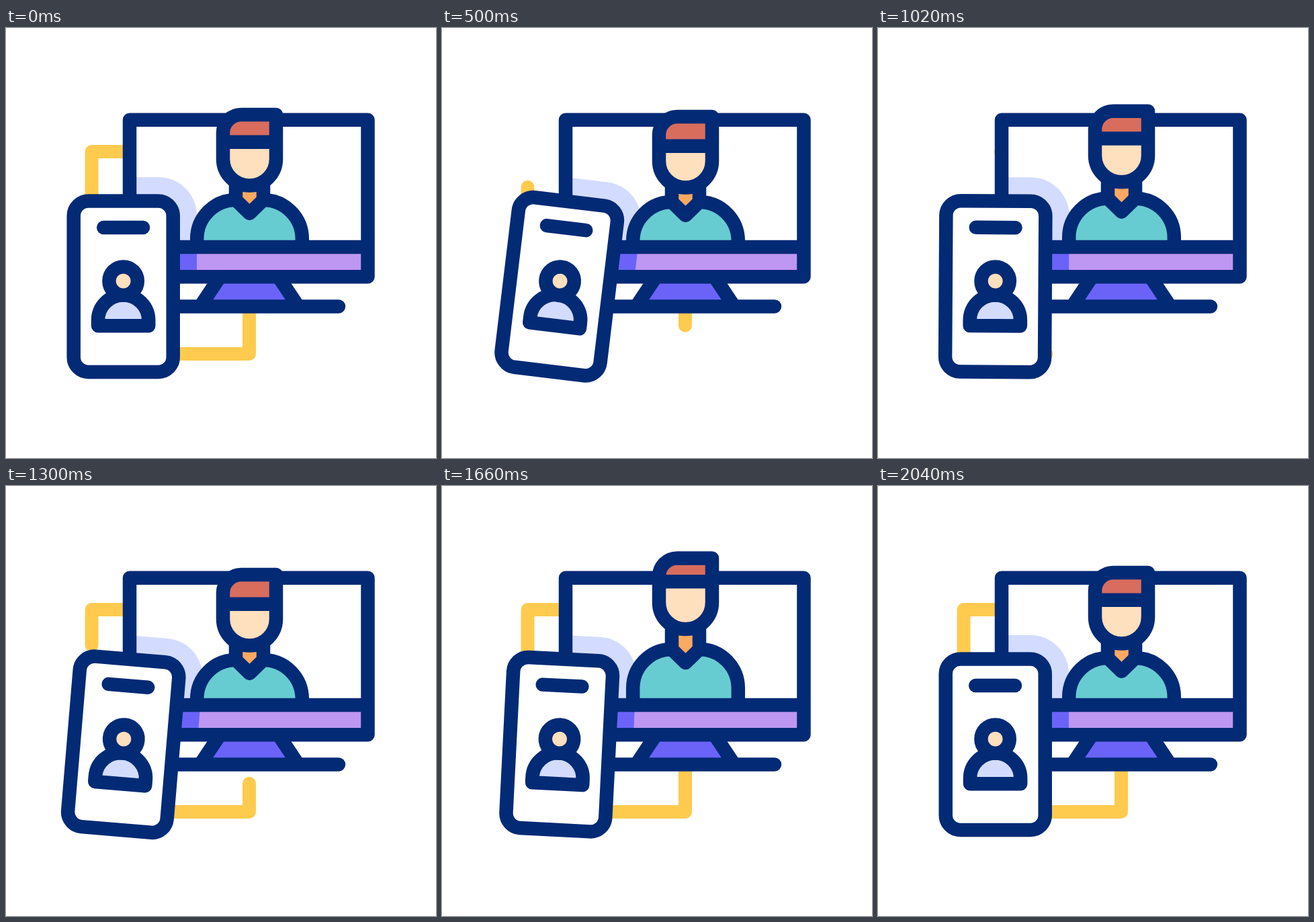
Animation of 640 by 640 pixels, one loop 2420 ms. Source, as an HTML page:

```html
<!DOCTYPE html>
<html lang="en">
<head>
<meta charset="utf-8">
<title>Video call</title>
<style>
  html, body { margin: 0; width: 100%; height: 100%; overflow: hidden; background: #fff; }
  svg { display: block; width: 100vw; height: 100vh; }
  .line { fill: none; stroke: #032a75; stroke-width: 20.5; stroke-linejoin: round; }
  .round { stroke-linecap: round; }
  .link { fill: none; stroke: #fecb4f; stroke-width: 20; stroke-linejoin: round; stroke-linecap: round; }
</style>
</head>
<body>
<svg viewBox="0 0 640 640">
  <defs>
    <clipPath id="screen"><rect x="184" y="137" width="354" height="189"/></clipPath>
    <clipPath id="bar"><rect x="184" y="326" width="354" height="44"/></clipPath>
    <rect id="halo" x="65" y="222" width="219" height="326" rx="57"/>
  </defs>

  <path class="link" pathLength="1" d="M184 184H127.5V257"/>
  <path class="link" pathLength="1" d="M249 485H362V414"/>

  <!-- monitor -->
  <path d="M318.7 370L289.3 414H434.7L405.3 370Z" fill="#6b63f8"/>
  <path class="line" d="M318.7 370L289.3 414M405.3 370L434.7 414"/>
  <path class="line round" d="M200 414.5H495"/>
  <rect x="184" y="136.7" width="354.5" height="189" fill="#fff"/>
  <rect x="184" y="326" width="354.5" height="44" fill="#bd97f1"/>
  <g clip-path="url(#screen)"><use class="tilt" href="#halo" fill="#d3dcfe"/></g>
  <g clip-path="url(#bar)"><use class="tilt" href="#halo" fill="#6b63f8"/></g>
  <rect class="line" x="184" y="136.7" width="354.5" height="233.6"/>

  <!-- person -->
  <path id="neck" fill="#fda961"/>
  <path id="neckSides" class="line"/>
  <path id="body" class="line" style="fill:#67ccd1"/>
  <path class="line" d="M184 326H538"/>
  <path id="face" fill="#fedfbe"/>
  <path id="hair" fill="#d86d5e"/>
  <path id="band" class="line"/>
  <path id="head" class="line"/>

  <!-- phone -->
  <g class="tilt">
    <rect class="line" x="100.7" y="257.5" width="148" height="254.4" rx="22" style="fill:#fff"/>
    <path class="line round" d="M145.2 297H204"/>
    <path class="line" d="M137 443.3V435A37.6 37.6 0 0 1 212.2 435V443.3Z" style="fill:#d3dcfe"/>
    <circle class="line" cx="174.6" cy="376.6" r="21.2" style="fill:#fedfbe"/>
  </g>
</svg>
<script>
const LOOP = 2420, TICK = 20;
const $ = id => document.getElementById(id);
const tilted = document.querySelectorAll('.tilt');
const links = document.querySelectorAll('.link');

// Keys are [tick, value] pairs, eased in and out between neighbours.
const tilt = [[0, 0], [20, 10], [40, -10], [60, 8], [74, -3], [86, 4], [102, 0]];
const bounce = (low, high) => [[0, 0], [20, low], [40, high], [60, low], [80, high], [102, 0]];
const bodyMove = bounce(6, -13.6);
const headMove = bounce(7.8, -22.7);
const bandMove = bounce(12.4, -29);
const linkOut = [[10, 0], [30, 1]];
const linkIn = [[50, 0], [70, 1]];

function at(keys, tick) {
  if (tick <= keys[0][0]) return keys[0][1];
  for (let i = 1; i < keys.length; i++) {
    const [t0, v0] = keys[i - 1], [t1, v1] = keys[i];
    if (tick < t1) {
      const u = (tick - t0) / (t1 - t0);
      return v0 + (v1 - v0) * u * u * (3 - 2 * u);
    }
  }
  return keys[keys.length - 1][1];
}

function drawLinks(tick) {
  const leaving = tick < 40;
  const from = leaving ? at(linkOut, tick) : 0;
  const to = leaving ? 1 : at(linkIn, tick);
  for (const link of links) {
    link.style.visibility = to - from > 0 ? 'visible' : 'hidden';
    link.setAttribute('stroke-dasharray', `${to - from} 3`);
    link.setAttribute('stroke-dashoffset', -from);
  }
}

function drawPerson(b, h, k) {
  const path = (id, d) => $(id).setAttribute('d', d);
  const collar = 256 + b, chin = 195 + h, top = 129 + h, brim = 169.7 + k;
  path('neck', `M342 ${collar - 41}H383V${collar}L362.5 ${collar + 20}L342 ${collar}Z`);
  path('neckSides', `M342 ${collar - 41}V${collar}M383 ${collar - 41}V${collar}`);
  path('body', `M284.2 326V${collar + 58}A57.8 58 0 0 1 342 ${collar}` +
    `L362.5 ${collar + 20}L383 ${collar}A57.8 58 0 0 1 440.8 ${collar + 58}V326`);
  path('face', `M323 ${brim}V${chin}A39.5 39.5 0 0 0 402 ${chin}V${brim}Z`);
  const crown = `V${top + 27}A27 27 0 0 1 350 ${top}H402`;
  path('hair', `M323 ${brim}${crown}V${brim}Z`);
  path('band', `M323 ${brim}H402`);
  path('head', `M323 ${chin}${crown}V${chin}A39.5 39.5 0 0 1 323 ${chin}Z`);
}

function draw(time) {
  const tick = Math.floor((time % LOOP) / TICK);
  const angle = at(tilt, tick);
  for (const el of tilted) el.setAttribute('transform', `rotate(${angle} 174.6 384.7)`);
  drawLinks(tick);
  drawPerson(at(bodyMove, tick), at(headMove, tick), at(bandMove, tick));
}

const start = performance.now();
function loop() {
  draw(performance.now() - start);
  requestAnimationFrame(loop);
}
loop();
</script>
</body>
</html>
```
